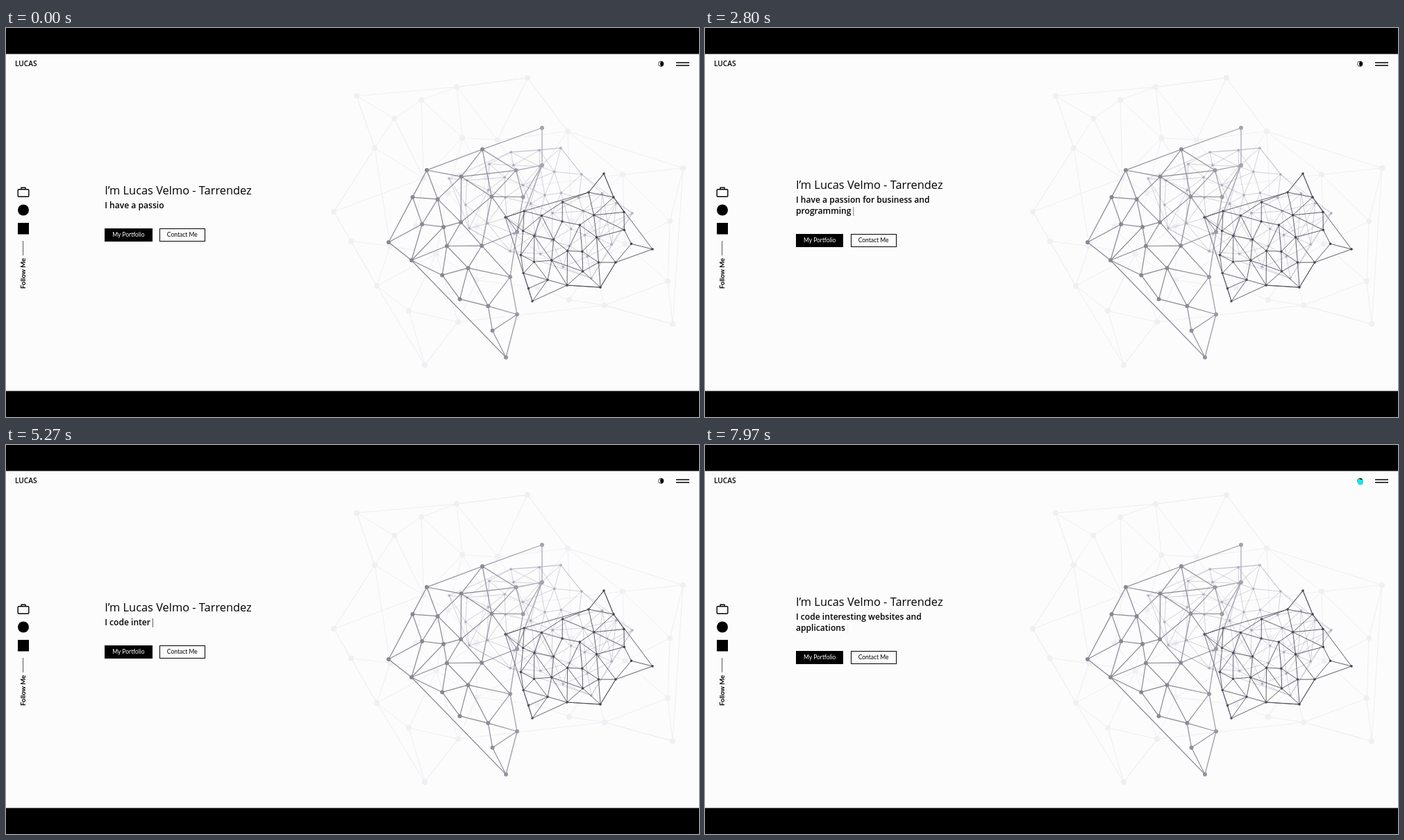
These frames come from a looping animation (998x561 px, 8000 ms). An HTML page with a canvas:

```html
<!DOCTYPE html>
<html lang="en">
<head>
<meta charset="utf-8">
<title>Portfolio</title>
<style>
  html, body { margin: 0; width: 100%; height: 100%; overflow: hidden; background: #000; }
  canvas, #icons { position: absolute; left: 0; top: 0; }
  #icons text { font-family: "Open Sans", sans-serif; font-weight: 600; }
  #intro { position: absolute; left: 131px; top: 165px; width: 234px; height: 200px;
    display: flex; justify-content: center; align-items: center; color: #000; }
  h1, p { margin: 0; font-family: "Open Sans", sans-serif; }
  h1 { font-size: 16.4px; font-weight: 400; line-height: 24px; white-space: nowrap; }
  p { margin: 2.25px 0 25.5px; font-size: 12.1px; font-weight: 600; line-height: 15.5px; }
  #caret { font-weight: 400; }
  #buttons { display: flex; gap: 10.3px; }
  #buttons span { box-sizing: border-box; height: 19px; padding: 0 10px; border: 1.3px solid #000;
    font: 8.5px/17px Lato, sans-serif; white-space: nowrap; }
  #buttons .solid { background: #000; color: #fff; }
</style>
</head>
<body>
<canvas id="web" width="998" height="561"></canvas>
<svg id="icons" width="998" height="561">
  <text x="13" y="54.5" font-size="10.1">LUCAS</text>
  <g fill="none" stroke="#000" stroke-width="1.4">
    <rect x="17.2" y="232.8" width="15.6" height="10.4" rx="1.2"/>
    <path d="M22 232.8v-2.6h6v2.6"/>
    <path d="M965 50h19M965 54h19" stroke-width="1.5"/>
    <circle cx="943.3" cy="51.7" r="3.7" stroke-width=".7"/>
  </g>
  <path d="M943.3 48a3.7 3.7 0 0 1 0 7.4q-2.6-3.7 0-7.4"/>
  <circle cx="25" cy="262.5" r="8"/>
  <rect x="17" y="281" width="16" height="16.5"/>
  <path d="M24.6 307v21" stroke="#555"/>
  <text transform="translate(28 376) rotate(-90)" font-size="9.5" style="font-family:Lato,sans-serif;font-weight:700">Follow Me</text>
  <circle id="pointer" cx="943.8" cy="53.6" r="4.1" fill="#0ee6f2"/>
</svg>
<div id="intro">
  <div>
    <h1>I’m Lucas Velmo - Tarrendez</h1>
    <p><span id="typed"></span><span id="caret">|</span></p>
    <div id="buttons"><span class="solid">My Portfolio</span><span>Contact Me</span></div>
  </div>
</div>
<script>
const WIDTH = 998, HEIGHT = 561, LOOP = 8000;
const PHRASES = [
  "I have a passion for business and programming",
  "I code interesting websites and applications"
];
const $ = id => document.getElementById(id);
const ctx = $("web").getContext("2d");
const distance = (a, b) => Math.hypot(a[0] - b[0], a[1] - b[1]);
const middle = (a, b) => [(a[0] + b[0]) / 2, (a[1] + b[1]) / 2];

function seededRandom(seed) {
  return () => (seed = (seed * 16807) % 2147483647) / 2147483647;
}

// Fills the outline with evenly scattered points: the most isolated of several tries wins.
function scatter(outline, shape, count, random) {
  const points = [...outline];
  const pick = () => {
    let p;
    do p = [random() * WIDTH, random() * HEIGHT]; while (!ctx.isPointInPath(shape, ...p));
    return p;
  };
  const gap = p => Math.min(...points.map(q => distance(p, q)));
  while (points.length < outline.length + count) {
    const tries = Array.from({ length: 12 }, pick);
    points.push(tries.reduce((best, p) => gap(p) > gap(best) ? p : best));
  }
  return points;
}

// Two points are joined when no third one lies near the middle between them.
function drawWeb({ outline, inner, seed, color, line, dot, clearance = .42 }) {
  const shape = new Path2D("M" + outline.join("L") + "Z");
  const points = scatter(outline, shape, inner, seededRandom(seed));
  const joined = (a, b) => {
    const m = middle(a, b), reach = clearance * distance(a, b);
    return ctx.isPointInPath(shape, ...m) &&
      points.every(p => p === a || p === b || distance(p, m) > reach);
  };
  ctx.strokeStyle = ctx.fillStyle = color;
  ctx.lineWidth = line;
  const edges = new Path2D(shape), dots = new Path2D();
  points.forEach((a, i) => {
    for (const b of points.slice(i + 1)) {
      if (!joined(a, b)) continue;
      edges.moveTo(...a);
      edges.lineTo(...b);
    }
    dots.moveTo(...a);
    dots.arc(...a, dot, 0, 7);
  });
  ctx.stroke(edges);
  ctx.fill(dots);
}

function fade(from, to, x0, x1) {
  const gradient = ctx.createLinearGradient(x0, 0, x1, 0);
  gradient.addColorStop(0, from);
  gradient.addColorStop(1, to);
  return gradient;
}

ctx.fillStyle = "#fcfcfc";
ctx.fillRect(0, 37.5, WIDTH, 486);

drawWeb({
  outline: [[505, 98], [649, 85], [751, 72], [809, 149], [975, 202], [960, 427],
    [862, 400], [651, 424], [603, 486], [534, 372], [472, 265], [531, 173]],
  inner: 24, seed: 11, color: "#efeff4", line: 1, dot: 4
});
drawWeb({
  outline: [[638, 217], [727, 179], [799, 173], [829, 211], [902, 267], [843, 361],
    [726, 322], [667, 289]],
  inner: 32, seed: 5, color: "rgba(145,145,168,.5)", line: .8, dot: 2, clearance: .3
});
drawWeb({
  outline: [[772, 144], [686, 175], [606, 205], [551, 309], [584, 335], [720, 475],
    [736, 413], [726, 359], [736, 294], [772, 198]],
  inner: 16, seed: 23, color: fade("#888893", "#a9a9b3", 680, 790), line: 1.2, dot: 3
});
drawWeb({
  outline: [[861, 210], [875, 244], [931, 319], [878, 338], [856, 374], [808, 371],
    [758, 394], [719, 273], [746, 264], [839, 237]],
  inner: 22, seed: 7, color: fade("#505060", "#3f3f4b", 720, 880), line: .85, dot: 1.8
});

// The loop opens with the first phrase partly typed.
function textAt(t) {
  const [first, second] = PHRASES;
  if (t < 3030) return first.slice(0, Math.floor(15.5 + t / 51));
  if (t < 4645) return first.slice(0, Math.max(0, first.length - Math.floor((t - 3030) / 35.5)));
  return second.slice(0, Math.floor((t - 4645) / 50.5));
}

function render(now) {
  const t = now % LOOP;
  $("typed").textContent = textAt(t);
  $("caret").style.opacity = Math.sin(t % 1000 / 1000 * Math.PI);
  $("pointer").style.display = t >= 7900 ? "" : "none";
  requestAnimationFrame(() => render(performance.now() - start));
}
const start = performance.now();
render(0);
</script>
</body>
</html>
```
